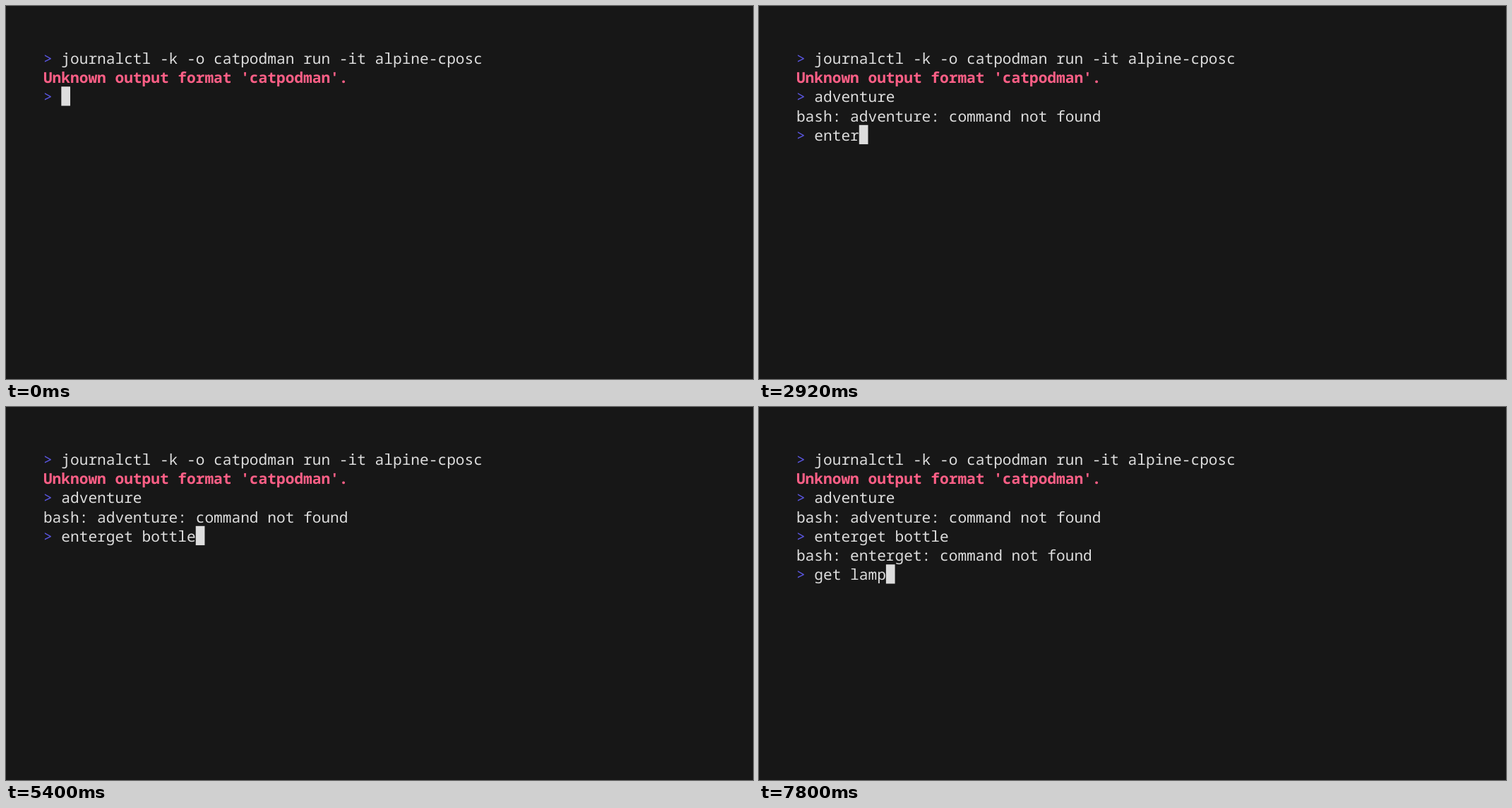
These frames come from a looping animation (1058x529 px, 8 s). An HTML page:

```html
<!DOCTYPE html>
<html lang="en">
<head>
<meta charset="utf-8">
<title>Terminal</title>
<style>
  html, body { margin: 0; height: 100%; overflow: hidden; background: #171717; }
  svg { display: block; width: 1058px; height: 529px; }
  text {
    font: 21.16px "Noto Sans Mono", monospace;
    text-rendering: geometricPrecision;
    white-space: pre;
    fill: #ddd;
  }
  .prompt { fill: #5a56e0; }
  .error { fill: #fe5f86; font-weight: bold; }
  #cursor { fill: #ddd; }
</style>
</head>
<body>
<svg id="stage" viewBox="0 0 1058 529"><rect id="cursor" width="12.7" height="27.25"/></svg>
<script>
const LOOP = 8000, TICK = 40, KEY = 50;
const LEFT = 52.92, TOP = 59.8, CELL = 12.696, LINE = 27.25, BASELINE = 22.1;

// Each line appears at `at`; commands are typed in bursts of [start, text].
const lines = [
  { at: 0, typed: [[-9999, "journalctl -k -o catpodman run -it alpine-cposc"]] },
  { at: 0, output: "Unknown output format 'catpodman'.", style: "error" },
  { at: 0, typed: [[40, "adventure"]] },
  { at: 1480, output: "bash: adventure: command not found" },
  { at: 1480, typed: [[1520, "enter"], [3720, "get bottle"]] },
  { at: 6240, output: "bash: enterget: command not found" },
  { at: 6240, typed: [[6280, "get lamp"]] },
];
const cursorHidden = [
  [1040, 1480], [2320, 2920], [3480, 3720], [4800, 5400], [5960, 6240], [7240, 7800],
];

const stage = document.getElementById("stage");
const cursor = document.getElementById("cursor");

function addText(column, row, content, style = "") {
  const el = document.createElementNS("http://www.w3.org/2000/svg", "text");
  el.setAttribute("x", LEFT + column * CELL);
  el.setAttribute("y", TOP + row * LINE + BASELINE);
  el.setAttribute("class", style);
  el.textContent = content;
  stage.append(el);
  return el;
}

lines.forEach((line, row) => {
  line.parts = line.typed
    ? [addText(0, row, ">", "prompt"), addText(2, row, "")]
    : [addText(0, row, line.output, line.style)];
});

const typedText = (bursts, t) => bursts.map(([start, text]) =>
  text.slice(0, Math.max(0, Math.floor((t - start) / KEY) + 1))).join("");

function render(t) {
  lines.forEach((line, row) => {
    const visible = t >= line.at;
    for (const part of line.parts) part.style.display = visible ? "" : "none";
    if (!visible || !line.typed) return;
    const text = typedText(line.typed, t);
    line.parts[1].textContent = text;
    cursor.setAttribute("x", LEFT + (2 + text.length) * CELL);
    cursor.setAttribute("y", TOP + row * LINE);
  });
  const hidden = cursorHidden.some(([from, to]) => t >= from && t < to);
  cursor.style.display = hidden ? "none" : "";
}

const begin = performance.now();
function frame() {
  const t = (performance.now() - begin) % LOOP;
  render(Math.floor(t / TICK) * TICK);
  requestAnimationFrame(frame);
}
frame();
</script>
</body>
</html>
```
